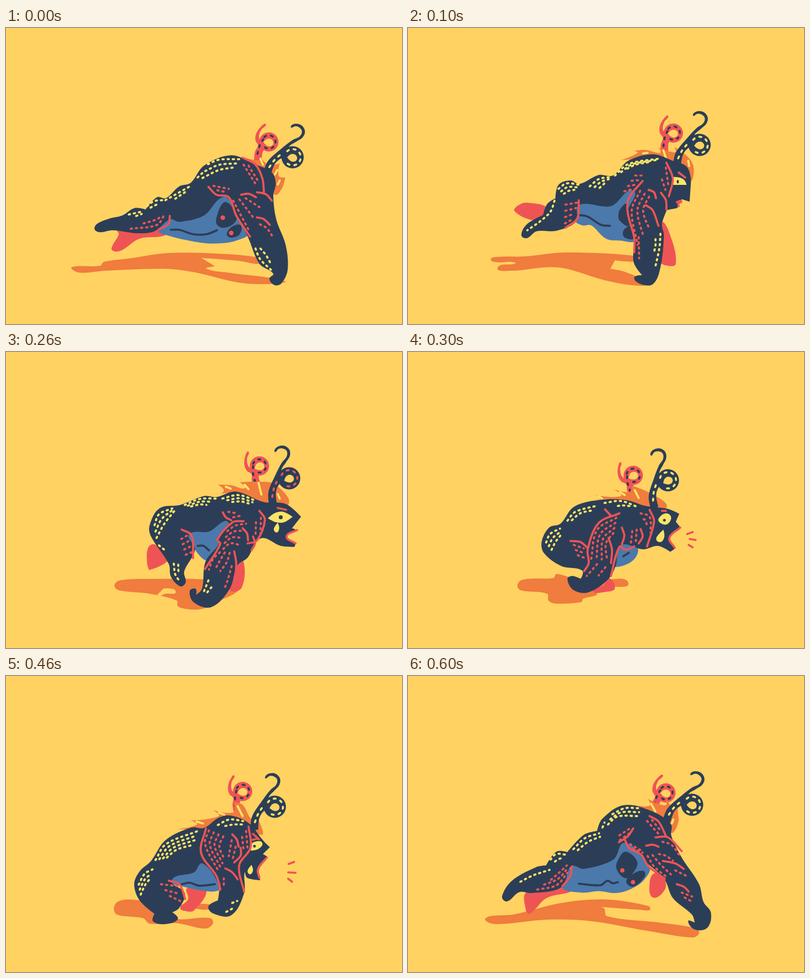
An HTML page with a canvas for the animation above (700 ms loop, 800x600 px).

```html
<!DOCTYPE html>
<html lang="en">
<head>
<meta charset="utf-8">
<title>Galloping beast</title>
<style>
html, body { margin: 0; width: 100%; height: 100%; overflow: hidden; background: #ffd261; }
canvas { display: block; }
</style>
</head>
<body>
<canvas id="stage" width="800" height="600"></canvas>
<script>
const g = document.getElementById('stage').getContext('2d');
const ground = '#ffd261', navy = '#2c3e57', red = '#ef5455', orange = '#f07c3e', blue = '#4b79ab', lemon = '#fce566';
g.lineCap = g.lineJoin = 'round';

// "x,y x,y!" to points; "!" marks a sharp corner.
const parse = text => text.split(' ').map(s => [...s.replace('!', '').split(',').map(Number), s.endsWith('!')]);

// Smooth curve through the points.
function curve(pts, closed) {
  const n = pts.length, path = new Path2D();
  const at = i => pts[closed ? (i + n) % n : Math.max(0, Math.min(n - 1, i))];
  const handle = (i, len) => {
    const a = at(i - 1), p = at(i), b = at(i + 1);
    const dx = b[0] - a[0], dy = b[1] - a[1], k = p[2] ? 0 : len / 3 / (Math.hypot(dx, dy) || 1);
    return [p[0] + dx * k, p[1] + dy * k];
  };
  path.moveTo(pts[0][0], pts[0][1]);
  for (let i = 0; i < (closed ? n : n - 1); i++) {
    const p = at(i), q = at(i + 1), len = Math.hypot(q[0] - p[0], q[1] - p[1]);
    path.bezierCurveTo(...handle(i, len), ...handle(i + 1, -len), q[0], q[1]);
  }
  return path;
}

function fill(color, text) {
  g.fillStyle = color;
  g.fill(curve(parse(text), true));
}
function stroke(color, pts) {
  g.strokeStyle = color;
  g.lineWidth = 4.2;
  g.stroke(curve(pts));
}
const line = (color, ...texts) => texts.forEach(t => stroke(color, parse(t)));

// Rows of short dashes, spread evenly from one guide curve to another.
function rows(color, count, first, last = first) {
  const a = parse(first), b = parse(last);
  g.setLineDash([2.6, 7.8]);
  for (let i = 0; i < count; i++) {
    const k = count > 1 ? i / (count - 1) : 0;
    stroke(color, a.map((p, j) => [p[0] + (b[j][0] - p[0]) * k, p[1] + (b[j][1] - p[1]) * k]));
  }
  g.setLineDash([]);
}
function disc(color, x, y, r) {
  g.fillStyle = color;
  g.beginPath();
  g.arc(x, y, r, 0, 7);
  g.fill();
}

// Curled horn, placed by the centre of its loop.
function horn(x, y, deg, color, spots, outline, r, stem) {
  g.save();
  g.translate(x, y);
  g.rotate(deg * Math.PI / 180);
  fill(color, outline);
  disc(color, 0, 0, r);
  fill(ground, '-11,0! -4,-6 4,-6 9,0 7,7 0,9 -6,6');
  g.strokeStyle = spots;
  g.lineWidth = 4;
  g.setLineDash([4, 10]);
  g.beginPath();
  g.arc(0, 0, r - 6, -2.3, 2.4);
  g.stroke();
  g.stroke(curve(parse(stem)));
  g.setLineDash([]);
  g.restore();
}
const farHorn = (x, y, deg) => horn(x, y, deg, red, navy,
  '-30,40! -28,20 -22,7 -27,-3 -26,-16 -17,-30 -6,-36 -15,-25 -20,-12 -17,-2 -8,10 -13,22 -15,42!', 19.5, '-23,24 -18,6 -11,-6');
const nearHorn = (x, y, deg, spots = lemon) => horn(x, y, deg, navy, spots,
  '-60,34! -50,8 -22,-18 0,-35 14,-42 19,-52 14,-60 6,-63 -3,-60 -2,-65 7,-68 19,-64 25,-52 20,-40 8,-32 -8,-20 -6,2 -22,2 -36,14 -44,36!', 22.5, '-47,20 -36,5 -20,-9');

function dive() {
  fill(orange, '132,487 142,483 190,482 198,474 250,467 330,456 440,458 515,467 515,478 470,472 395,466! 422,483! 405,488 450,496 563,513 530,519 470,516 380,495 320,488 200,492 150,496');
  fill(red, '225,410 321,405 322,420 270,427 235,450 220,453 213,447 228,418');
  farHorn(531, 231, 0);
  fill(orange, '480,262! 510,268 512,260! 532,278 553,274! 551,300 564,303! 558,324 543,338 520,300');
  line(lemon, '514,265 519,277', '548,288 543,297', '553,309 549,317');
  fill(blue, '308,410 340,380 450,340 492,412 465,431 420,437 380,433 325,420');
  fill(navy, '179,408 184,397 210,386 235,380 260,365 282,368! 305,343 323,345 350,321 373,314 400,279 455,258 500,275 537,293 545,315 540,340 546,388 565,440 569,490 556,518 542,521 532,508 540,498 512,478 488,422 465,380 447,344 430,347 400,380 350,393 331,388 300,412 265,416 215,410 190,414');
  fill(navy, '425,385 439,354 453,358 466,385 457,399 438,405 426,398');
  fill(navy, '446,418 456,403 474,400 472,418 455,425');
  disc(red, 438, 384.5, 4.7);
  disc(red, 455, 415.5, 4.7);
  nearHorn(579, 262, 0);
  line(navy, '333,409 350,409 378,418 405,418 426,410');
  line(red, '478,263 504,277 518,305 521,332', '475,338 490,336 505,343', '507,333 525,337 537,350', '409,322 425,338 450,343 465,380 493,423', '507,384 520,387 533,399', '331,381 328,397 308,409');
  rows(red, 2, '419,320 450,326', '427,329 446,333');
  rows(red, 2, '480,277 506,319', '490,279 511,313');
  rows(red, 3, '459,350 490,409', '484,345 512,363');
  rows(red, 2, '252,407 305,399 321,377', '278,396 302,389 311,384');
  rows(red, 1, '513,398 527,406 540,425');
  rows(lemon, 3, '408,276 430,267 472,266', '397,304 430,288 458,283');
  rows(lemon, 1, '387,303 402,289');
  rows(lemon, 2, '322,349 375,319', '342,346 366,330');
  rows(lemon, 2, '285,361 299,351 317,349', '292,364 302,359 311,356');
  rows(lemon, 2, '248,378 276,372', '263,381 274,377');
  rows(lemon, 2, '504,447 513,468 535,490', '514,447 525,460 536,480');
}

function glide() {
  fill(orange, '167,469 180,464 235,463 320,455 470,463 470,473 418,471! 409,488! 440,495 482,518 460,522 400,512 320,488 280,485 210,492 181,486 217,477 205,474 180,475');
  fill(red, '215,371 222,360 240,354 285,368 262,385 248,389');
  fill(red, '513,395 528,415 541,478 520,481 506,470');
  farHorn(536, 213, -7);
  fill(orange, '430,268! 464,253 456,249! 480,247 512,253 504,242! 540,252 538,241! 562,258 575,275 577,296 570,310 525,274 480,266');
  line(lemon, '516,248 521,264', '475,254 484,253', '566,269 568,280');
  fill(blue, '338,360 455,325 448,400 460,430 430,431 400,427 370,400 352,400 337,390');
  fill(navy, '229,420 240,398 273,379! 281,357 298,345! 304,318 328,309 347,316 385,298 414,299 445,269 495,256 537,270 562,280 571,302 571,322! 569,352! 553,347! 544,365! 523,369! 513,398 517,420 510,485 495,519 470,519 457,506 473,501! 456,475 456,430 443,375 455,330 410,361 345,359 340,392 300,411 260,412 240,426');
  fill(navy, '425,378 430,365 442,357 448,400 428,391');
  fill(navy, '434,415 440,405 453,403 457,426 438,425');
  nearHorn(589, 237, -9);
  line(navy, '344,379 362,382 390,399 408,401');
  fill(lemon, '536,302! 548,303 558,308 563,318! 536,318!');
  line(navy, '545,310 545,313');
  line(red, '522,273 535,305 527,341', '474,310 446,345 444,375 457,425 457,455', '486,328 497,333 501,345', '511,334 521,349 522,368', '480,359 494,369 506,401', '345,349 342,386 318,405', '547,293 560,303');
  line(red, '543,353 552,351 546,356 547,361');
  rows(red, 4, '459,299 478,299', '437,331 456,326');
  rows(red, 3, '469,330 452,370 464,440', '487,342 475,370 488,409');
  rows(red, 1, '466,424 467,467');
  rows(red, 2, '521,283 526,320', '513,307 520,328');
  rows(red, 4, '318,358 342,354', '317,396 334,387');
  rows(lemon, 3, '418,299 445,276 512,264', '443,285 460,277 492,271');
  rows(lemon, 3, '367,321 386,306 411,302', '387,324 395,317 400,311');
  rows(lemon, 3, '304,326 320,315 347,318', '315,336 325,330 336,328');
  rows(lemon, 1, '296,350 288,372 268,391 241,410');
  rows(lemon, 2, '510,417 508,445 499,487', '500,428 500,440 497,455');
}

function gather() {
  fill(orange, '219,473 230,463 290,460 400,461 470,472 425,508 395,521 365,521 347,515 345,504 290,490 228,483');
  fill(ground, '313,485 321,479 343,486 322,490 307,494');
  fill(red, '287,397 300,390 331,416 289,442! 285,428');
  fill(red, '460,425 479,422 476,478 452,482');
  farHorn(512, 231, -28);
  fill(orange, '421,288! 440,282 428,269! 455,270 483,276 472,264! 518,263 545,269 570,310 520,305 460,287');
  line(lemon, '444,273 454,277', '482,269 490,278', '510,265 516,289', '549,288 553,297');
  fill(blue, '360,362 455,345 440,380 425,412 405,423 378,395');
  fill(navy, '290,352 310,317 352,310 400,292 425,294 465,283 520,304 565,308 596,334! 578,357! 588,361! 567,374 585,388! 583,395! 555,393 514,378 488,417 467,433 452,480 415,517 380,508 371,485 383,480 384,492! 396,480 403,425 430,389 426,378 449,345 410,364 370,370 382,400 360,445 363,467 352,475 333,455 329,430 293,374');
  nearHorn(572, 256, -25, red);
  line(navy, '387,393 399,393 410,402');
  fill(lemon, '529,337! 544,326 560,324 579,334! 562,345 545,345');
  fill(lemon, '549,346! 552,357 547,366 541,359');
  disc(navy, 555, 335, 4);
  line(red, '438,325 444,335 455,341', '480,343 458,345 427,380 433,389 402,440', '512,322 523,340 507,382 488,388', '478,357 487,368 489,382', '499,374 503,388 496,402', '461,404 465,427 464,451', '355,360 375,372 378,418');
  line(red, '549,316 566,320', '588,361 567,374 585,388');
  rows(red, 2, '449,324 467,327', '459,335 474,332');
  rows(red, 4, '447,363 463,352 485,348', '439,399 453,388 472,391');
  rows(red, 3, '432,406 418,420 410,441', '452,407 446,426 433,444');
  rows(red, 1, '456,434 447,465 440,483');
  rows(red, 2, '515,336 514,368', '505,345 504,373');
  rows(red, 4, '354,379 366,372', '363,411 375,406');
  rows(lemon, 3, '300,351 309,329 336,317', '304,377 320,348 342,320');
  rows(lemon, 1, '309,392 325,405');
  rows(lemon, 3, '361,310 391,298 426,297', '374,313 392,309 405,310');
  rows(lemon, 3, '437,297 470,290 506,302', '457,304 475,303 490,307');
  rows(lemon, 2, '339,429 342,451 352,466', '348,431 348,440 349,448');
  rows(lemon, 2, '409,463 398,490', '415,477 405,489');
}

function shout() {
  fill(orange, '221,473 230,462 265,459 294,458 300,450 330,457 400,461 445,468 405,477 379,485 382,492 354,500 350,507 298,510 284,504 281,490 228,483');
  fill(red, '373,484 395,473 405,458 418,479 400,486');
  farHorn(455, 250, -34);
  fill(orange, '377,299! 388,296 378,290! 430,292 415,278! 447,284 453,271! 495,289 522,316 480,315 405,299');
  line(lemon, '386,293 392,297', '428,284 438,290', '458,280 466,296');
  fill(blue, '343,382 375,363 462,395 455,422 415,436 395,420');
  fill(navy, '270,385 285,356 308,348 335,314 385,300 440,300 480,312 525,318 548,328! 541,344! 550,355! 528,375 540,398! 530,405! 505,393 475,400 430,392 420,432 405,460 365,487 335,483 322,460 332,454 349,460! 352,443 310,434 275,408');
  nearHorn(525, 260, -31);
  line(navy, '435,414 446,407');
  fill(lemon, '506,342 511,332 522,327 531,333 529,344 519,350');
  fill(lemon, '516,360! 518,373 513,384 504,384 502,376');
  disc(navy, 518, 341, 2.8);
  line(red, '398,319 409,331', '427,327 385,347 363,400 365,428 356,444', '488,320 497,343 483,394', '432,356 437,372 432,390', '405,377 412,400 410,428', '470,359 474,374 466,388', '410,454 427,395 440,401 457,394');
  line(red, '328,383 348,385 362,396', '513,322 521,322', '550,356 528,377 539,397', '564,369 575,365', '569,379 581,381', '567,391 575,396');
  rows(red, 4, '421,336 382,361 370,420', '415,367 400,388 402,421');
  rows(red, 2, '453,363 450,390', '462,360 460,387');
  rows(red, 2, '470,327 488,334 490,366', '476,339 480,341 483,355');
  rows(red, 3, '335,391 355,398', '343,412 358,418');
  rows(red, 2, '382,430 361,454', '399,436 385,453');
  rows(lemon, 3, '279,386 287,369 307,358', '290,401 298,385 308,372');
  rows(lemon, 2, '322,342 338,324 384,311', '331,341 348,327 372,321');
  rows(lemon, 2, '397,306 430,302 466,315', '424,312 435,311 453,313');
}

function crouch() {
  fill(orange, '218,472 225,458 250,453 340,463 412,463 414,473 335,480 413,491 418,502 402,512 345,501 290,502 277,491 225,484');
  fill(red, '366,430 404,430 380,475 360,476 352,470 368,452');
  farHorn(478, 234, -18);
  fill(orange, '345,310! 386,301 372,293! 430,284 418,272! 460,276 460,256! 478,261 496,290 500,279! 513,298 516,322 455,292 400,310');
  line(lemon, '385,295 398,299', '430,277 441,281', '468,264 478,284');
  fill(blue, '330,415 395,375 434,428 415,437 350,425');
  fill(navy, '259,422 270,396 293,375 322,333 375,307 400,308 430,287 455,283 490,298 520,334 533,347! 519,361! 528,366! 508,390 514,414! 487,409 482,398 481,440 455,485 418,481 409,467 428,455! 429,422 397,380 380,398 335,414 361,440 350,470 336,479! 347,493 320,503 297,497 300,482! 270,455');
  nearHorn(543, 265, -15);
  line(navy, '355,422 371,419 390,425 422,422');
  fill(lemon, '495,354! 496,340 514,335 518,342 509,351');
  fill(lemon, '496,383! 499,394 493,402 488,395');
  disc(navy, 502, 345, 2.7);
  line(red, '404,309 394,358 425,405 433,432', '490,305 494,348 471,384 481,437', '457,321 466,331 470,346', '474,348 474,364 461,378', '443,390 457,398 468,412', '329,415 350,422 362,452', '499,320 511,331', '498,332 507,330');
  line(red, '527,368 509,392 512,409', '571,381 582,377', '570,398 585,399', '570,411 578,417');
  rows(red, 4, '410,313 402,340 430,397', '439,325 431,345 441,371');
  rows(red, 2, '485,314 488,350', '477,326 480,352');
  rows(red, 2, '456,333 450,365', '464,346 458,371');
  rows(red, 2, '440,410 440,424', '431,421 432,434');
  rows(red, 3, '313,422 346,426', '331,446 354,457');
  rows(lemon, 3, '268,423 280,401 296,392', '272,443 282,422 292,410');
  rows(lemon, 4, '302,373 323,341 388,314', '325,368 345,352 379,342');
  rows(lemon, 2, '428,302 451,291 479,294', '443,304 460,301 478,301');
  rows(lemon, 2, '457,460 467,456', '445,478 462,469');
}

function rise() {
  fill(orange, '208,496 225,487 290,486 275,500 245,506');
  fill(orange, '300,470 345,448 388,450 405,460 366,471 364,479 470,486 493,496 480,511 405,498 320,490');
  fill(red, '410,428 430,400 450,388 450,425 437,445 418,450');
  fill(red, '312,435 340,427 349,440 318,470 331,477 305,482');
  farHorn(517, 206, 0);
  fill(orange, '360,290! 374,282 365,275! 405,264 385,248! 430,247 416,228! 464,238 455,212! 498,249 507,242! 511,265 455,253 402,292');
  line(lemon, '372,276 383,281', '395,253 406,259', '430,234 439,244', '463,223 469,235', '501,248 502,254');
  fill(blue, '310,412 400,360 440,302 470,345 440,405 415,427 385,431 360,424 316,436');
  fill(navy, '220,472 230,457 253,458! 252,420 272,380 300,375! 325,326 370,291 402,290! 430,257 460,247 500,262 518,290 522,303! 570,340 586,390 575,453 550,459 534,442 550,438! 535,410 498,391 465,350 440,328 438,305 418,346 350,390 308,412 317,445 298,491 249,483! 255,495 245,502');
  fill(navy, '403,376 410,356 428,343 449,350 440,376 415,391');
  fill(navy, '432,392 439,375 453,363 463,365 456,387');
  disc(red, 420.5, 375, 4.8);
  disc(red, 443, 387, 4.8);
  nearHorn(564, 238, 2);
  line(navy, '338,422 353,412 380,415 410,411 427,399');
  line(red, '447,264 435,279 433,302', '462,275 438,308 468,350', '485,252 497,264 490,294', '475,288 490,283 511,291 522,310', '478,312 486,326 502,331', '500,350 517,358 542,362 556,376', '306,410 316,440 310,479');
  rows(red, 3, '461,285 446,304 448,326', '468,305 466,320 464,341');
  rows(red, 2, '478,258 489,277', '487,256 495,272');
  rows(red, 2, '484,294 513,299', '480,303 510,307');
  rows(red, 2, '514,337 531,341 554,357', '512,347 533,353 552,367');
  rows(red, 2, '296,431 302,450 286,481', '307,424 311,451 301,480');
  rows(lemon, 2, '407,291 419,269 440,255 467,250', '415,295 417,287 422,280 429,272');
  rows(lemon, 3, '329,323 348,304 391,296', '318,362 342,334 387,317');
  rows(lemon, 2, '308,371 315,358', '330,353 361,328');
  rows(lemon, 2, '261,411 269,389 292,381', '263,441 270,410 288,391');
  rows(lemon, 1, '235,466 251,460');
  rows(lemon, 2, '480,358 493,376 544,405 557,432', '507,382 525,386 545,396 556,417');
}

function stretch() {
  fill(orange, '156,495 165,487 215,483 310,460 400,453 485,466 489,474 470,474 365,466! 395,470 402,487 510,500 580,511 588,521 575,530 480,516 370,497 280,494 180,503');
  fill(red, '240,438 328,422 333,435 280,450 246,482 238,474');
  fill(red, '488,420 498,400 518,412 519,433 495,449');
  farHorn(521, 237, 0);
  fill(orange, '455,261! 488,263 485,249! 520,262 521,247! 537,269 544,262! 547,292! 542,308 532,318 485,280');
  line(lemon, '491,259 500,275', '536,291 533,299');
  fill(blue, '310,425 340,380 435,334 488,385 478,412 450,432 420,440 385,436 350,439');
  fill(navy, '190,447 210,415 260,387 279,384! 300,356 322,357! 355,322 382,314! 392,290 435,262 490,273 531,300 532,324 553,368 588,422 597,458 612,480 605,510 580,514 566,497 579,500! 574,484 535,450 518,412 485,381 438,338 415,372 355,391 330,386 310,428 250,440 225,438 200,457');
  fill(navy, '421,390 426,370 440,356 463,376 457,396 440,410');
  fill(navy, '441,417 455,401 476,395 478,407 455,427');
  disc(red, 433, 394, 4.5);
  disc(red, 454.5, 418, 4.5);
  nearHorn(574, 261, 0);
  line(navy, '345,421 389,424 403,415 413,420 424,418');
  line(red, '488,284 506,295 522,326', '455,309 444,325 426,337', '438,332 448,350 471,362 485,385 519,411', '481,344 495,342 506,346', '500,327 525,327 553,355', '515,375 540,380 557,391', '543,422 557,427 567,437', '331,386 328,405 312,426');
  rows(red, 2, '483,294 507,321', '493,292 509,312');
  rows(red, 2, '427,323 450,308', '428,333 447,319');
  rows(red, 2, '449,341 475,356', '454,350 474,358');
  rows(red, 2, '484,365 498,387 522,407', '494,363 510,382 531,402');
  rows(red, 2, '514,336 532,342 549,364', '507,361 520,364 535,374');
  rows(red, 1, '540,394 564,406');
  rows(red, 2, '553,439 574,447', '559,449 575,458');
  rows(red, 3, '261,433 300,424 322,399', '289,413 305,399 321,384');
  rows(lemon, 3, '413,280 438,268 468,268', '404,301 423,285 466,284');
  rows(lemon, 1, '393,307 397,297');
  rows(lemon, 2, '334,351 357,329 386,319', '343,353 364,336 388,326');
  rows(lemon, 2, '288,372 299,361 318,362', '297,376 304,371 314,369');
  rows(lemon, 1, '227,417 253,404 286,393');
}

const poses = [dive, glide, gather, shout, crouch, rise, stretch];

function draw() {
  g.fillStyle = ground;
  g.fillRect(0, 0, 800, 600);
  poses[Math.floor(performance.now() / 100) % poses.length]();
  requestAnimationFrame(draw);
}
draw();
</script>
</body>
</html>
```
